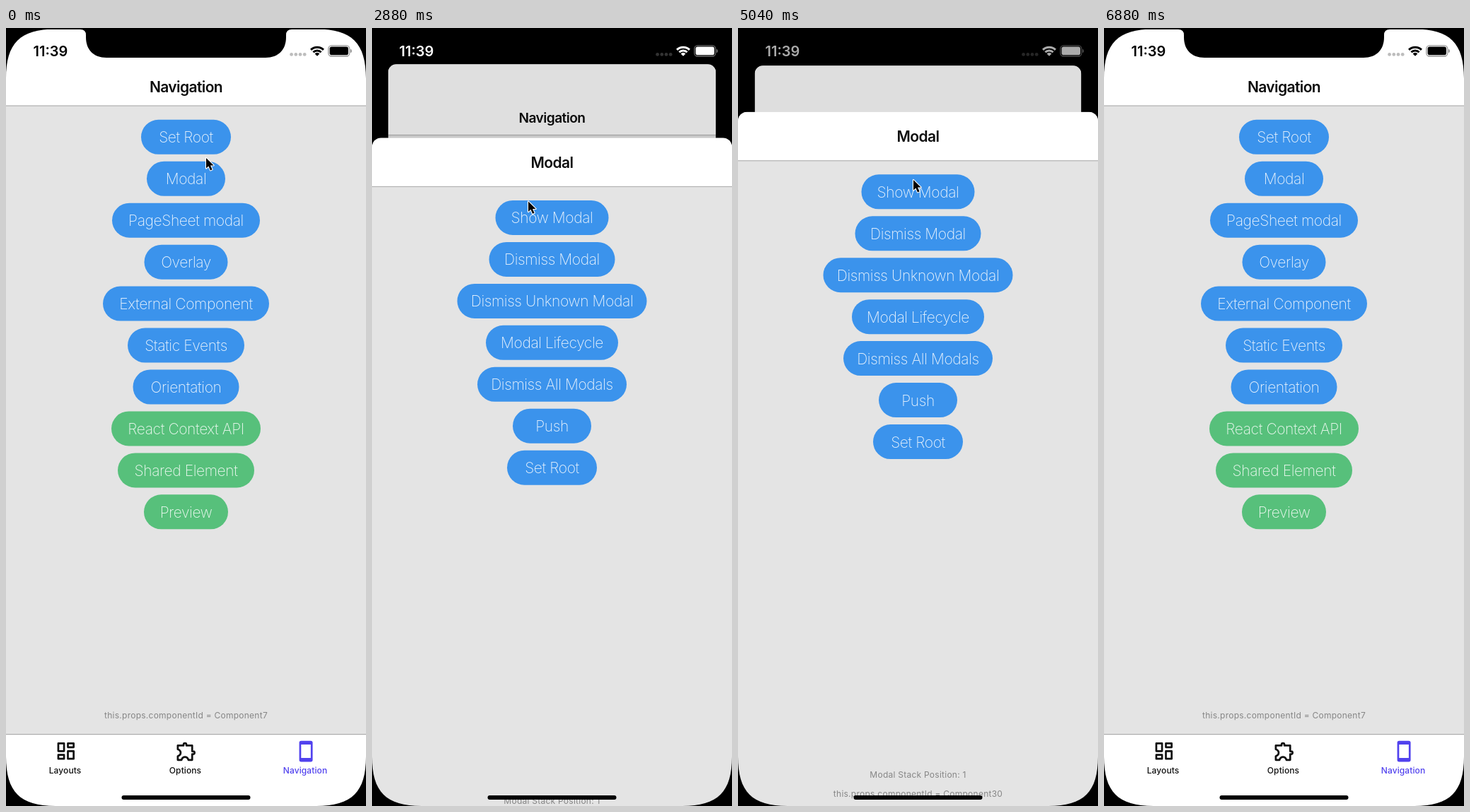
Animation of 509x1101 px, one loop 6920 ms. Source, as an HTML page with a canvas:

```html
<!DOCTYPE html>
<html lang="en">
<head>
<meta charset="utf-8">
<title>Modal presentation</title>
<style>
html, body { margin: 0; width: 100%; height: 100%; overflow: hidden; background: #000; }
canvas { display: block; width: 509px; height: 1101px; }
</style>
</head>
<body>
<canvas id="stage"></canvas>
<script>
const W = 509, H = 1101, MID = 254.5, LOOP = 6920;
const SHEET_TOP = 68, TRAVEL = H - SHEET_TOP;
const BLUE = '#3b93ec', GREEN = '#57c07b', ACCENT = '#5142ee', GREY = '#e4e4e4';
const FONT = 'Inter, Roboto, sans-serif';
const PRESENT_1 = 700, RELEASE = 3080, PRESENT_2 = 4780, DISMISS = 6265;

const canvas = document.getElementById('stage');
const ctx = canvas.getContext('2d');
const ratio = window.devicePixelRatio || 1;
canvas.width = W * ratio;
canvas.height = H * ratio;

// [label, pill width]
const navButtons = [
  ['Set Root', 127], ['Modal', 111], ['PageSheet modal', 209], ['Overlay', 118],
  ['External Component', 235], ['Static Events', 165], ['Orientation', 150],
  ['React Context API', 211, GREEN], ['Shared Element', 193, GREEN], ['Preview', 119, GREEN]
];
const modalButtons = [
  ['Show Modal', 160], ['Dismiss Modal', 178], ['Dismiss Unknown Modal', 268],
  ['Modal Lifecycle', 187], ['Dismiss All Modals', 211], ['Push', 111], ['Set Root', 127]
];

// [time, x, y]
const cursorKeys = [
  [0, 283, 183], [300, 272, 205], [600, 262, 214], [1300, 260, 213], [1640, 216, 97],
  [1760, 215, 101], [2400, 216, 106], [2880, 221, 244], [3090, 226, 495], [3180, 227, 517],
  [3560, 227, 517], [4200, 248, 222], [4640, 248, 214], [5500, 248, 214], [6040, 265, 247],
  [6400, 266, 247], [6760, 530, 225], [LOOP, 530, 225]
];
// [time, sheet offset]
const dragKeys = [[2480, 0], [2880, 87], [RELEASE, 380], [3280, 940], [3420, TRAVEL]];

const icons = {
  dashboard: new Path2D('M4 4h6v8H4zM4 16h6v4H4zM14 4h6v4h-6zM14 12h6v8h-6z'),
  puzzle: new Path2D('M3 6h6V5a1.5 1.5 0 0 1 3 0v1h6v6h1a1.5 1.5 0 0 1 0 3h-1v6h-3.9' +
    'c-.6-1.8-2-3-3.6-3s-3 1.2-3.6 3H3v-3.9c1.8-.6 3-2 3-3.6s-1.2-3-3-3.6z'),
  phone: new Path2D('M7 1h10a2 2 0 0 1 2 2v18a2 2 0 0 1-2 2H7a2 2 0 0 1-2-2V3a2 2 0 0 1 2-2z' +
    'M7 5v14h10V5z'),
  arrow: new Path2D('M0 0V14.6L3.4 11.4L6 17.4L8.6 16.3L6 10.5H10.6Z')
};
const notch = new Path2D('M0 0H509V2H404Q396 2 396 10V13C396 31 385 42 367 42' +
  'H142C124 42 113 31 113 13V10Q113 2 105 2H0Z');

const clamp = v => Math.min(1, Math.max(0, v));

function spring(ms) {
  const x = Math.max(0, ms) * 0.01826;
  return 1 - (1 + x) * Math.exp(-x);
}

// Monotone cubic interpolation of column c
function track(keys, t, c) {
  const last = keys.length - 1;
  if (t <= keys[0][0]) return keys[0][c];
  if (t >= keys[last][0]) return keys[last][c];
  const slope = i => (keys[i + 1][c] - keys[i][c]) / (keys[i + 1][0] - keys[i][0]);
  const tangent = i => {
    if (i === 0 || i === last) return 0;
    const a = slope(i - 1), b = slope(i);
    return a * b <= 0 ? 0 : 2 * a * b / (a + b);
  };
  let i = 0;
  while (keys[i + 1][0] <= t) i++;
  const d = keys[i + 1][0] - keys[i][0], u = (t - keys[i][0]) / d, v = 1 - u;
  return keys[i][c] * v * v * (1 + 2 * u) + keys[i + 1][c] * u * u * (1 + 2 * v) +
    d * u * v * (v * tangent(i) - u * tangent(i + 1));
}

// 1 = modal fully shown, 0 = hidden
function coverage(t) {
  if (t < 2400) return spring(t - PRESENT_1);
  if (t < 3600) return 1 - track(dragKeys, t, 1) / TRAVEL;
  return t < DISMISS ? spring(t - PRESENT_2) : 1 - spring(t - DISMISS);
}

function statusLevel(t) {
  const ramp = start => clamp((t - start) / 390);
  return ramp(PRESENT_1) - ramp(RELEASE) + ramp(PRESENT_2) - ramp(DISMISS);
}

function rect(x, y, w, h, color) {
  ctx.fillStyle = color;
  ctx.fillRect(x, y, w, h);
}

function pill(x, y, w, h, r, color) {
  ctx.fillStyle = color;
  ctx.beginPath();
  ctx.roundRect(x, y, w, h, r);
  ctx.fill();
}

function text(str, x, y, size, weight, color, spacing = 0, align = 'center') {
  ctx.font = `${weight} ${size}px ${FONT}`;
  ctx.letterSpacing = spacing + 'px';
  ctx.textAlign = align;
  ctx.fillStyle = color;
  ctx.fillText(str, x, y);
}

const title = (str, y) => text(str, MID, y, 21, 600, '#0c0c0c', -0.6);
const note = (str, y) => text(str, MID, y, 12, 400, '#868686', 0.25);

function buttons(list, top) {
  list.forEach(([label, width, color = BLUE], i) => {
    const y = top + i * 58.95;
    pill(MID - width / 2, y, width, 49, 24.5, color);
    text(label, MID, y + 32.5, 21, 200, 'rgba(255,255,255,.9)', -0.4);
  });
}

function icon(path, x, y, color, filled) {
  ctx.save();
  ctx.translate(x, y);
  ctx.scale(1.357, 1.357);
  ctx.lineWidth = 2;
  ctx.lineJoin = 'round';
  ctx.fillStyle = ctx.strokeStyle = color;
  if (filled) ctx.fill(path, 'evenodd'); else ctx.stroke(path);
  ctx.restore();
}

function drawNavigation(cover) {
  const scale = 1 - 0.098 * cover;
  ctx.save();
  ctx.translate(MID * (1 - scale), 56 * cover);
  ctx.scale(scale, scale);
  ctx.beginPath();
  ctx.roundRect(0, 0, W, H, 13);
  ctx.clip();
  rect(0, 0, W, H, GREY);
  rect(0, 0, W, 109.5, '#fff');
  rect(0, 109.5, W, 1.2, '#b4b4b4');
  title('Navigation', 90.5);
  buttons(navButtons, 129.8);
  note('this.props.componentId = Component7', 977.3);
  rect(0, 999, W, H - 999, '#fff');
  rect(0, 999, W, 1.2, '#acacac');
  icon(icons.dashboard, 68.5, 1007, '#111');
  icon(icons.puzzle, 238.8, 1007.3, '#111');
  icon(icons.phone, 407.8, 1007.3, ACCENT, true);
  text('Layouts', 83.5, 1055.3, 12, 500, '#111', 0.1);
  text('Options', 253.5, 1055.3, 12, 500, '#111', 0.1);
  text('Navigation', 423, 1055.3, 12, 500, ACCENT, 0.1);
  rect(0, 0, W, H, `rgba(0,0,0,${0.135 * cover})`);
  ctx.restore();
}

function drawModal(cover, id) {
  ctx.save();
  ctx.translate(0, SHEET_TOP + TRAVEL * (1 - cover));
  ctx.beginPath();
  ctx.roundRect(0, 0, W, H + 20, 13);
  ctx.clip();
  rect(0, 0, W, H + 20, GREY);
  rect(0, 0, W, 68.5, '#fff');
  rect(0, 68.5, W, 1.2, '#b4b4b4');
  title('Modal', 42.2);
  buttons(modalButtons, 88.6);
  note('Modal Stack Position: 1', 942.5);
  note('this.props.componentId = Component' + id, 969.5);
  ctx.restore();
}

function drawStatus(level) {
  const v = Math.round(255 * level);
  const color = `rgb(${v},${v},${v})`;
  text('11:39', 38.5, 39.8, 20, 600, color, 0, 'left');
  ctx.globalAlpha = 0.26 - 0.06 * level;
  for (let i = 0; i < 4; i++) pill(401.2 + i * 6.2, 35, 4.8, 4.8, 2.4, color);
  ctx.globalAlpha = 1;

  ctx.strokeStyle = ctx.fillStyle = color;
  ctx.lineWidth = 3;
  for (const r of [12.6, 7.9]) {
    ctx.beginPath();
    ctx.arc(440, 39.8, r, -Math.PI * 0.75, -Math.PI * 0.25);
    ctx.stroke();
  }
  ctx.beginPath();
  ctx.moveTo(440, 39.8);
  ctx.arc(440, 39.8, 4.8, -Math.PI * 0.75, -Math.PI * 0.25);
  ctx.fill();

  ctx.globalAlpha = 0.42;
  ctx.lineWidth = 1.3;
  ctx.beginPath();
  ctx.roundRect(455.8, 24.8, 30, 15.2, 4.5);
  ctx.stroke();
  pill(487, 30, 1.8, 5, [0, 2, 2, 0], color);
  ctx.globalAlpha = 1;
  pill(457.6, 26.6, 26.4, 11.6, 2.8, color);
}

function drawBezel() {
  ctx.fillStyle = '#000';
  ctx.fill(notch);
  for (const [x, y, sx, sy] of [[0, 1.5, 1, 1], [W, 1.5, -1, 1], [0, H, 1, -1], [W, H, -1, -1]]) {
    ctx.beginPath();
    ctx.moveTo(x, y);
    ctx.lineTo(x, y + 70 * sy);
    ctx.bezierCurveTo(x, y + 20 * sy, x + 20 * sx, y, x + 70 * sx, y);
    ctx.fill();
  }
}

function drawCursor(t) {
  ctx.save();
  ctx.translate(track(cursorKeys, t, 1), track(cursorKeys, t, 2) + 1);
  ctx.lineJoin = 'round';
  ctx.lineWidth = 2.2;
  ctx.strokeStyle = '#fff';
  ctx.stroke(icons.arrow);
  ctx.fillStyle = '#000';
  ctx.fill(icons.arrow);
  ctx.restore();
}

function draw(now) {
  const t = now % LOOP;
  const cover = coverage(t);
  ctx.setTransform(ratio, 0, 0, ratio, 0, 0);
  rect(0, 0, W, H, '#000');
  drawNavigation(cover);
  if (cover > 0.0005) drawModal(cover, t < 3600 ? 26 : 30);
  drawBezel();
  drawStatus(statusLevel(t));
  pill(163.5, 1086, 182, 6, 3, '#000');
  drawCursor(t);
}

const start = performance.now();
function tick() {
  draw(performance.now() - start);
  requestAnimationFrame(tick);
}
tick();
</script>
</body>
</html>
```
